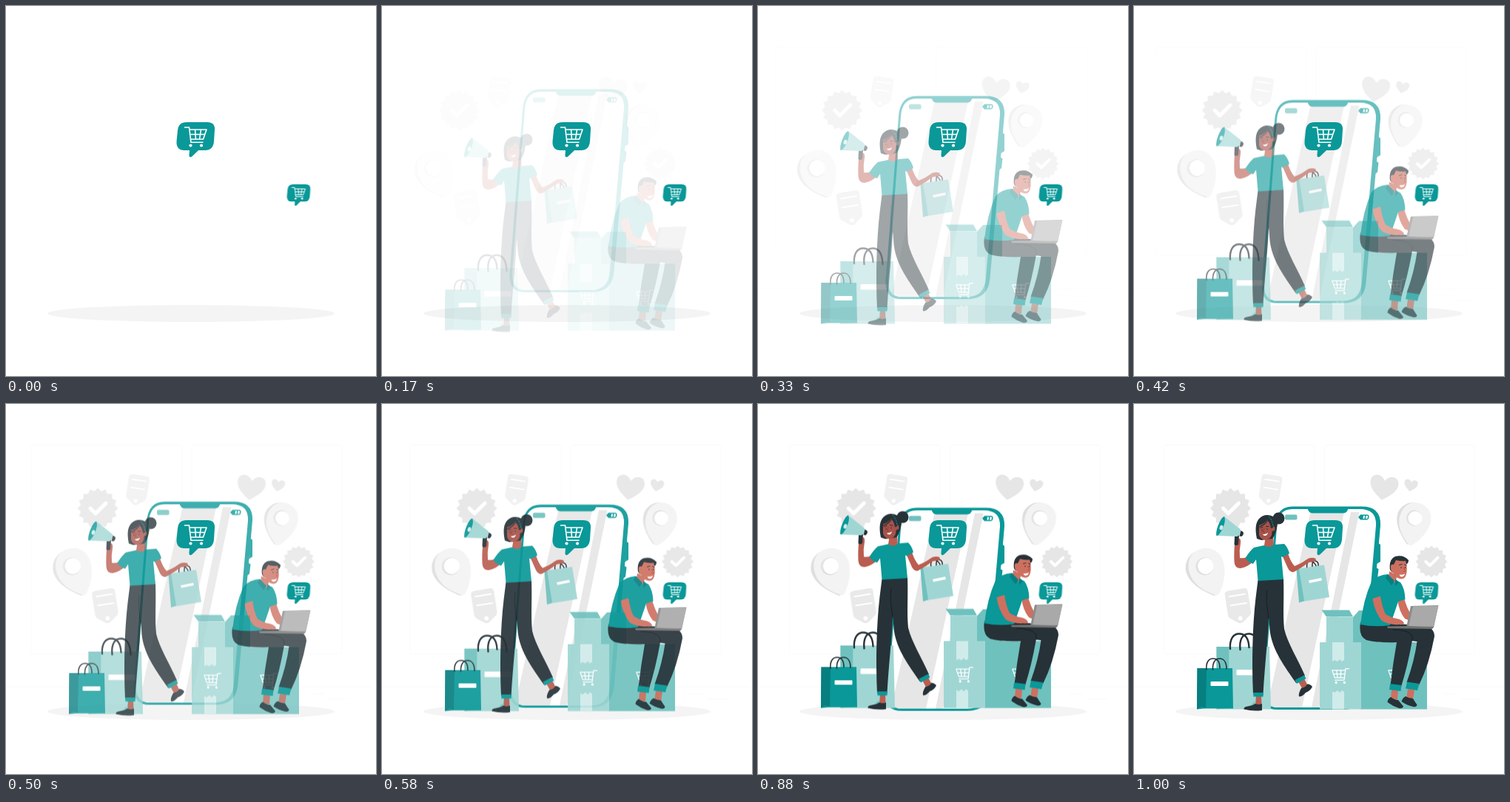
An HTML page for the animation above (1.04 s loop, 500 by 500 pixels).

```html
<!DOCTYPE html>
<html lang="en">
<head>
<meta charset="utf-8">
<title>Online shopping</title>
<style>
  html, body { margin: 0; width: 100%; height: 100%; overflow: hidden; background: #fff; }
  svg { display: block; width: 100vw; height: 100vh; }
  .up, .down, .right { animation: 1s cubic-bezier(.36, -.01, .5, 1.38) both paused; }
  .up { animation-name: up; }
  .down { animation-name: down; }
  .right { animation-name: right; }
  @keyframes up { from { opacity: 0; transform: translateY(30px); } to { opacity: 1; transform: none; } }
  @keyframes down { from { opacity: 0; transform: translateY(-30px); } to { opacity: 1; transform: none; } }
  @keyframes right { from { opacity: 0; transform: translateX(-30px); } to { opacity: 1; transform: none; } }
  .teal { fill: #0a9898; }
  .deep { fill: #077e80; }
  .mid { fill: #6fc1be; }
  .light { fill: #9fd6d4; }
  .pale { fill: #cfebea; }
  .dark { fill: #263238; }
  .white { fill: #fff; }
  .grey { fill: #e6e6e6; }
  .skin { fill: #ba5d50; }
  .tan { fill: #ce7060; }
  .line { fill: none; stroke-linecap: round; stroke-linejoin: round; }
</style>
</head>
<body>
<svg viewBox="0 0 500 500" xmlns="http://www.w3.org/2000/svg">
  <defs>
    <g id="cart">
      <path class="line" stroke="#fff" stroke-width="1.6" d="M241.5 164H247.500L250 184.300H266M248 167H271L266.500 180H249.500M248.800 173.500H268.500M255.500 167L256.500 180M263.500 167L261.500 180"/>
      <circle class="white" cx="249.500" cy="188.500" r="2.100"/>
      <circle class="white" cx="264" cy="188.500" r="2.100"/>
    </g>
    <g id="bubble">
      <path class="teal" d="M244 157H272Q282.500 157 282 167L281 183Q280 195 269 195H260L251.500 203.300Q248 205.800 247.400 202L248 195H241Q230 195 230.500 183L232 168Q233 157 244 157Z"/>
      <use href="#cart"/>
    </g>
    <g id="badge">
      <path id="burst" class="grey"/>
      <path class="line" stroke="#fff" stroke-width="5" stroke-linecap="butt" d="M-10 0L-3 7L11 -7"/>
    </g>
    <g id="tag">
      <path d="M-9 -20H10Q14 -20 14 -16V9Q14 12 11 14L3 20Q0 22 -3 20L-11 14Q-14 12 -14 9V-16Q-14 -20 -9 -20Z"/>
      <path class="line" stroke="#fff" stroke-width="1.800" d="M-9 -13H10M-9 -2H10"/>
      <circle class="white" cx="0" cy="15" r="2.600"/>
    </g>
    <g id="pin">
      <path fill="#dedede" d="M-3 -25C-18 -25 -28 -12 -27 1C-26 18 -9 33 0 40L5 38Z"/>
      <path fill="#f3f3f3" d="M0 -26C16 -26 26 -14 25 1C24 18 13 33 7 39Q3 42 0 38C-12 29 -23 17 -23 1C-23 -15 -14 -26 0 -26Z"/>
      <circle fill="#e0e0e0" cx="-1" cy="-2" r="12"/>
      <circle class="white" cx=".5" cy="-2" r="10.800"/>
    </g>
    <path id="heart" class="grey" d="M0 17C-8 11 -20 3 -19 -8C-18 -18 -5 -19 0 -9C5 -19 18 -18 19 -8C20 3 8 11 0 17Z"/>
  </defs>

  <!-- backdrop -->
  <g class="right">
    <g fill="none" stroke="#fafafa">
      <rect x="40.500" y="55.500" width="204" height="282" rx="2"/>
      <rect x="257.500" y="55.500" width="203" height="282" rx="2"/>
      <path d="M0 382.500H500M418 391.500H437M442 398.500H470"/>
    </g>
    <use href="#badge" transform="translate(130.500 141)"/>
    <use href="#badge" transform="translate(402 213) scale(.78)"/>
    <use href="#tag" fill="#f0f0f0" transform="translate(184 116) rotate(9)"/>
    <use href="#tag" fill="#e9e9e9" transform="translate(141 273) rotate(-9) scale(1.120)"/>
    <use href="#pin" transform="translate(97 221) rotate(-17)"/>
    <use href="#pin" transform="translate(379 156) rotate(16) scale(.88)"/>
    <use href="#heart" transform="translate(337.500 113) rotate(9)"/>
    <use href="#heart" transform="translate(374 110) rotate(11) scale(.48)"/>
  </g>

  <ellipse cx="250" cy="415.500" rx="194" ry="11.500" fill="#f4f4f4"/>

  <!-- phone -->
  <g class="down">
    <path class="teal" d="M330 188L333 190V213L328 216ZM327 221L330.500 223L329 236L325 239Z"/>
    <path class="teal" d="M214 138.500H308Q334 138.500 333 164L313.500 385Q311 413 283 413H194Q171 413 172.500 388L190 166Q192 138.500 214 138.500Z"/>
    <path class="white" d="M214 142H305Q328 142 327 164L308 384Q306 410 283 410H195Q175 410 176 388L193 166Q194.500 142 214 142Z"/>
    <path class="grey" d="M238.500 146H284L227 410H195Q184 410 181 404ZM293 146H304.500L250 410H240Z"/>
    <path class="teal" d="M234 140H290Q288 147.500 283 147.500H241Q236 147.500 234 140Z"/>
    <rect class="mid" x="204" y="149.500" width="16.500" height="7" rx="2"/>
    <path class="teal" d="M306 149.500H315Q318 149.500 317.500 153Q317 156.500 314 156.500H306L303 153Z"/>
    <path class="white" d="M310 151H312L311.500 155H309.500ZM313.500 151H316L315.500 155H313Z"/>
  </g>

  <!-- boxes -->
  <g class="up">
    <path class="mid" d="M296 288L304 279H330V322H296Z"/>
    <path class="light" d="M260 288H296V322H260Z"/>
    <path class="mid" d="M253.500 278.500H291L296 287.500H260Z"/>
    <path class="mid" d="M306 322H396V412.500H306Z"/>
    <path class="light" d="M251 322H307V412.500H251Z"/>
    <path class="pale" d="M268 322H284V346L281 348L278 345L275 348L271 346L268 348ZM268 412.500V388L271 390L275 387L278 390L281 387L284 389V412.500Z"/>
    <use href="#cart" transform="translate(476.500 231.300) scale(-.77 .77)"/>
    <use href="#cart" transform="translate(552.500 231.300) scale(-.77 .77)"/>
  </g>

  <!-- bags on the floor -->
  <g class="up">
    <path class="light" d="M111.500 328H183L185 412.500H111.500Z"/>
    <path class="mid" d="M111.500 328H128.500L127.500 411L111.500 412.500ZM158 407L163 402L164 407Z"/>
    <rect class="white" x="138.500" y="359" width="36" height="7.500" rx="1"/>
    <path class="line" stroke="#263238" stroke-width="2.400" d="M130 331C129 318 134 310.500 142 310.500C151 310.500 155 318 155.500 329M143.500 332C142 318 147 310.500 155 310.500C164 310.500 168 318 168.500 332"/>
    <path class="teal" d="M85.500 357H133L134 411.500H95L85 412.500Z"/>
    <path class="deep" d="M85.500 357H98L97 411L91 409L85 412.500Z"/>
    <rect class="white" x="103.500" y="375" width="24" height="6" rx="1"/>
    <path class="line" stroke="#263238" stroke-width="1.600" d="M98 359C97 349 101 344 107 344C113 344 116 349 116 357M106.500 359C106 349 110 344 115.500 344C122 344 125 350 125 358"/>
  </g>

  <!-- woman -->
  <g class="up">
    <!-- feet and legs -->
    <path class="skin" d="M165 394H172L172.500 407H164ZM222 375L230 371L235 381L228 386Z"/>
    <path class="dark" d="M164 405Q169 407 173 405L173 414Q160 415.500 148.500 412.500Q148 409 154 408.500Q160 408 164 405ZM226 384Q232 383 234 378.500Q238 378 241 382Q238 388 232 390Q228 395 223.500 395.500Q221 393 226 384Z"/>
    <path class="dark" d="M167.500 238L202 236C203 262 201 283 203 304C207 322 222 346 231 367L219 377C203 354 188 334 184 309C183 302 183 293 182 288C181 318 177 350 174.500 392H161C159 350 160 300 164.500 262Z"/>
    <path class="line" stroke="#111c21" stroke-width=".8" d="M182 290C180 276 178 264 180 252"/>
    <path class="teal" d="M161 390H175L174.500 395.500H161.500ZM217.500 373L230 366.500L232.500 371L220 378Z"/>
    <!-- right arm and bag -->
    <path class="line" stroke="#263238" stroke-width="1.400" d="M234 223Q232 212 239 212Q244 213 247 221M241 222Q240 211 245 212Q250 213 249 220"/>
    <path class="light" d="M220 223L257 217.500L264 261L225 267.500Z"/>
    <path class="mid" d="M219.500 224L223 222.500L230 266L223 268.500Z"/>
    <path class="white" d="M236 238.500L253 235L254 238.500L237 242Z"/>
    <path class="skin" d="M200 204L208 202Q212 214 217 219Q227 215 232 211Q238 206 245 208.500Q247 211 244 213L236 214Q226 222 216 227Q211 228 208 222Z"/>
    <!-- left arm -->
    <path class="skin" d="M152 207L161 213Q154 220 144 222Q136 222 135.500 213Q135 200 136 190Q135 182 140 181Q145 181 144 188Q142 198 143 208Q148 209 152 207Z"/>
    <!-- megaphone -->
    <path class="dark" d="M136 179L142 177L141 190Q138 192 135.500 190Z"/>
    <path class="light" d="M122 152L144 169.500Q145 175 140 179L111.500 178Q112 162 122 152Z"/>
    <path class="teal" d="M122 152Q124.500 157 120 168Q115 178 111.500 178Q110 173 114.500 162Q119 152 122 152Z"/>
    <ellipse class="pale" cx="118" cy="167" rx="2.300" ry="3.200" transform="rotate(20 118 167)"/>
    <path class="dark" d="M144.500 171L147.500 173Q149 176 145.500 179L142.500 178.500Z"/>
    <!-- torso -->
    <path class="teal" d="M176 191Q183 193 190 190L203 189Q208 194 210 202L201 207L199 206L202 237L167.500 239L165 210L161 216Q154 214 150.500 208Q157 198 162 194Z"/>
    <path class="skin" d="M178 178L188 174L188.500 190Q184 196 176 191Z"/>
    <!-- head -->
    <circle class="dark" cx="195.500" cy="154.500" r="8"/>
    <path class="dark" d="M166 182Q162 163 169 155Q177 147 188 152Q196 158 193 168Q191 177 187 182L172 184Z"/>
    <path fill="#a95249" d="M169 164Q176 162 181 156Q186 160 187 165Q192 165 190 171L186.500 172Q187 181 180 183Q172 185 169 177Z"/>
    <path class="dark" d="M167 166Q176 164 182 155L188 158L188 167L185 168Q184 161 181 158Q175 166 168 167Z"/>
    <path class="line" stroke="#0a9898" stroke-width="1" stroke-dasharray="2 2" d="M182 152Q187 157 188 165"/>
    <path class="white" d="M174 176Q178 176.500 181 174Q180 178 177 178Q175 178 174 176Z"/>
    <path class="line" stroke="#263238" stroke-width="1" d="M171 167.500L174 166.500M178.500 165.500L182 165.500M173 170V171M180 168.800V169.800"/>
    <path class="line" stroke="#86392f" stroke-width=".8" d="M176 168L174.500 173L176.500 173.500"/>
  </g>

  <!-- man -->
  <g class="up">
    <path class="tan" d="M348 386H357L356 399H347ZM370 385L379 386L377 399H368Z"/>
    <path class="dark" d="M347 396Q352 400 357 400Q361 405 364 408.500Q363 412 358 411Q349 408 342.500 403Q343 398 347 396ZM367 395Q372 398 377 398Q380 403 382.500 406.500Q382 410 377 409Q368 407 361.500 402Q363 397 367 395Z"/>
    <path class="dark" d="M345 296L394 300Q406 303 406 314Q399 352 385 380L368.500 376Q379 347 382.500 321Q370 320 350 316Z"/>
    <path class="dark" d="M306 295L346 297Q365 303 373 307Q378 311 375.500 322Q370 353 361 382L346.500 380Q350 350 355 322Q330 323 314 319Q303 314 306 295Z"/>
    <path class="line" stroke="#111c21" stroke-width=".8" d="M350 305Q378 305 376 319"/>
    <path class="teal" d="M346 378L361.500 380L360.500 388L345 386ZM369 375.500L385.500 378L383 387L367 384.500Z"/>
    <!-- torso and arms -->
    <path class="tan" d="M356 264L365 262Q368 275 376 287L373 293L366 290Q358 280 356 264Z"/>
    <path class="teal" d="M343 230Q329 231 321 240Q310 264 306 298Q325 302 346 299Q351 285 357 267L366.500 264Q366 249 360 241L352 237Z"/>
    <path class="tan" d="M345 226L356 232L352.500 241Q347 241 344 234Z"/>
    <path class="deep" d="M343 230L352 239L348 245L340 235ZM353 236L358 241L353 246Z"/>
    <path class="tan" d="M322 261L333 259Q335 274 340 284Q348 289 355 290Q362 291 365 296Q364 299 359 298Q345 299 335 293Q325 281 322 261Z"/>
    <path class="teal" d="M322 242Q332 240 334.500 259L321 263.500Q318 252 322 242Z"/>
    <!-- head -->
    <path class="dark" d="M346 224Q344 210 353 206Q364 203 371 211Q371 216 367 217Q350 219 349 228Z"/>
    <path class="tan" d="M347 222Q346 216 351 217L354 211Q362 213 367 212Q370 221 368 230Q366.500 236.500 361 236.500Q353 235 350 228Q347 226 347 222Z"/>
    <path class="white" d="M358.500 230.500Q362 231.500 366 229.500Q365 233.500 361.500 233.500Q359 233 358.500 230.500Z"/>
    <path class="line" stroke="#263238" stroke-width="1" d="M358.500 217.500L362 216.500M365.500 217L368 218M361 220.500V221.500M366.500 220.500V221.500"/>
    <path class="line" stroke="#a9483b" stroke-width=".8" d="M364.500 221L367 226L364.500 226.500"/>
    <!-- laptop -->
    <path fill="#8a8a8a" d="M374 273L410 272Q412 272 411 274L405 302H368Z"/>
    <path fill="#a9a9a9" d="M377 273.500L411.500 272.500L405 300.500L371 301Z"/>
    <path fill="#737373" d="M342 300.500L372 300L405 301.500L403 304L343 303Z"/>
  </g>

  <use href="#bubble"/>
  <use href="#bubble" transform="translate(379.500 241) scale(.613) translate(-230.300 -157)"/>
</svg>
<script>
  const LOOP = 1040, STEP = 1000 / 24;

  function burst(points, inner, outer) {
    const list = Array.from({ length: points * 2 }, (_, i) => {
      const r = i % 2 ? inner : outer, a = i * Math.PI / points;
      return (r * Math.sin(a)).toFixed(2) + ' ' + (-r * Math.cos(a)).toFixed(2);
    });
    return 'M' + list.join('L') + 'Z';
  }
  document.getElementById('burst').setAttribute('d', burst(16, 23.5, 27.5));

  const slides = document.getAnimations();

  // Motion is held at 24 pictures per second.
  function draw() {
    const n = Math.floor((performance.now() % LOOP + 4) / STEP);
    const time = n < 2 ? 0 : Math.min(1000, (n + 0.5) * STEP);
    for (const slide of slides) slide.currentTime = time;
    requestAnimationFrame(draw);
  }
  draw();
</script>
</body>
</html>
```
